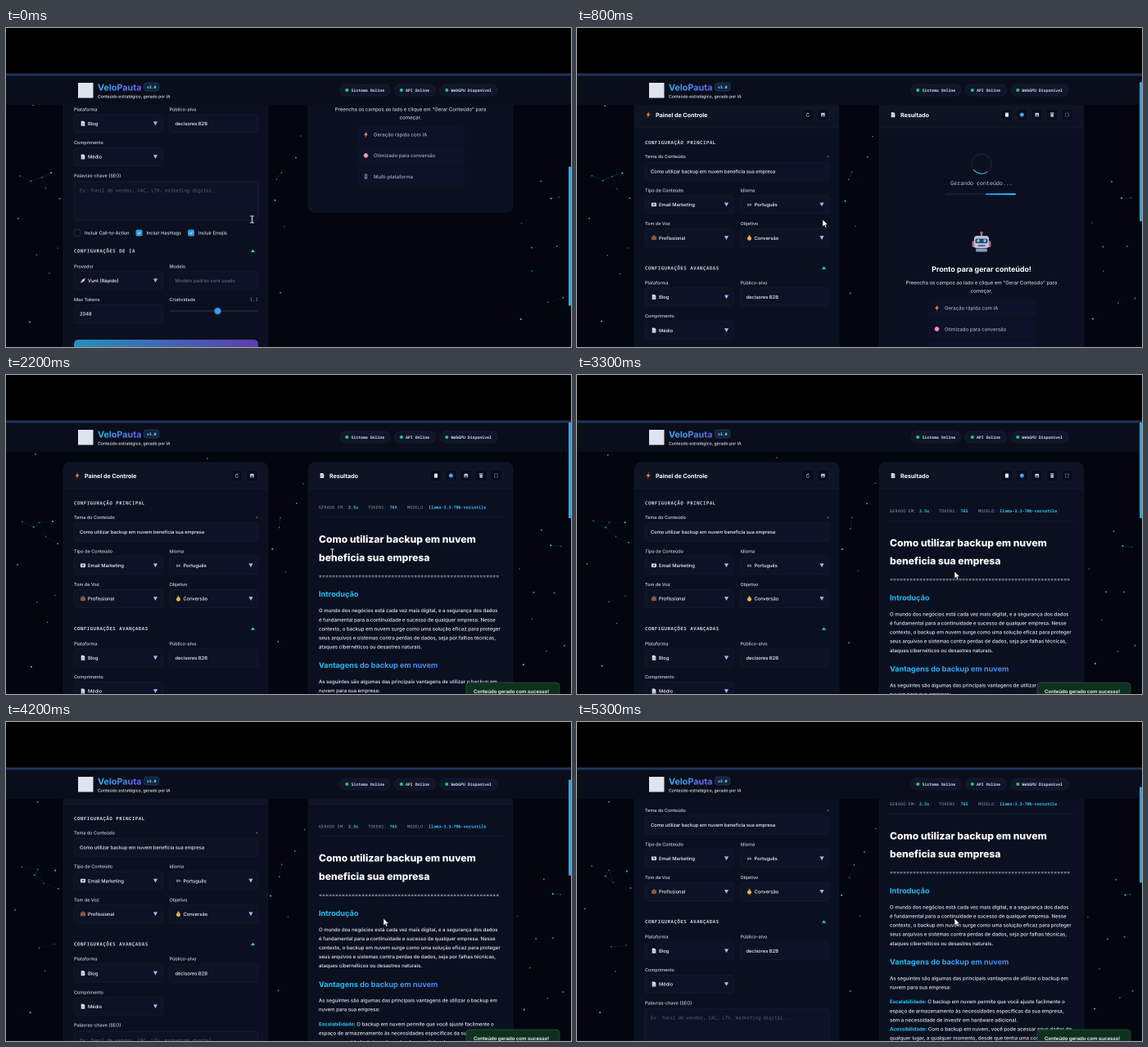
Recreate the animation shown at these times as an HTML page with a canvas. Size 690 by 390 pixels, loop 5.4 s.

```html
<!DOCTYPE html>
<html lang="pt-BR">
<head>
<meta charset="utf-8">
<title>Gerador de conteúdo</title>
<style>
html, body { margin: 0; width: 100%; height: 100%; overflow: hidden; background: #000; }
canvas { display: block; width: 690px; height: 390px; }
</style>
</head>
<body>
<canvas id="stage" width="1380" height="780"></canvas>
<script>
const ctx = document.getElementById('stage').getContext('2d');
ctx.scale(2, 2); // supersampled for soft small type
ctx.textRendering = 'geometricPrecision';
const LOOP = 5400, STEP = 100, RESULT_AT = 1800;
const SANS = 'Inter, sans-serif', MONO = '"Noto Sans Mono", monospace';
const CYAN = '#2fc3f2', SOFT = '#ccd4e4', DIM = '#5a6580';
const TOPIC = 'Como utilizar backup em nuvem beneficia sua empresa';

const clamp = v => Math.max(0, Math.min(1, v));
const progress = (t, from, to) => clamp((t - from) / (to - from));
const ease = p => (1 - Math.cos(Math.PI * p)) / 2;

// y is the optical middle of the line
function text(str, x, y, size = 6, color = '#f4f6fb', opt = {}) {
  const { weight = 500, font = SANS, align = 'left', spacing = 0 } = opt;
  ctx.font = `${weight} ${size}px ${font}`;
  ctx.letterSpacing = spacing + 'px';
  ctx.textAlign = align;
  ctx.fillStyle = color;
  ctx.fillText(str, x, y + size * 0.39);
}

function box(x, y, w, h, r, fill, stroke) {
  ctx.beginPath();
  ctx.roundRect(x, y, w, h, r);
  if (fill) { ctx.fillStyle = fill; ctx.fill(); }
  if (stroke) { ctx.strokeStyle = stroke; ctx.lineWidth = 0.7; ctx.stroke(); }
}

function dot(x, y, r, color) {
  ctx.beginPath();
  ctx.arc(x, y, r, 0, 7);
  ctx.fillStyle = color;
  ctx.fill();
}

function shape(points, fill, stroke) {
  ctx.beginPath();
  points.forEach(([x, y]) => ctx.lineTo(x, y));
  ctx.closePath();
  ctx.fillStyle = fill;
  ctx.fill();
  if (stroke) { ctx.strokeStyle = stroke; ctx.lineWidth = 0.6; ctx.stroke(); }
}

function gradient(x0, x1, from, to) {
  const g = ctx.createLinearGradient(x0, 0, x1, 0);
  g.addColorStop(0, from);
  g.addColorStop(1, to);
  return g;
}

const icons = {
  bolt: (x, y) => shape([[x + 1, y - 4], [x - 2.5, y + 0.7], [x - 0.3, y + 0.7], [x - 1, y + 4], [x + 2.5, y - 1], [x + 0.4, y - 1]], '#f0823c'),
  page(x, y) {
    shape([[x - 2.3, y - 3], [x + 0.8, y - 3], [x + 2.3, y - 1.5], [x + 2.3, y + 3], [x - 2.3, y + 3]], '#dfe3eb');
    for (let i = 0; i < 3; i++) box(x - 1.5, y - 0.7 + i * 1.2, 3, 0.4, 0, '#8791a8');
  },
  mail(x, y) {
    box(x - 3, y - 2.3, 6, 4.6, 0.6, '#d8e0f2');
    box(x - 1.3, y - 1.2, 2.6, 2.4, 0, '#4a73c4');
  },
  flag: (x, y) => text('BR', x, y, 3.8, '#d5dbe8', { weight: 600, align: 'center' }),
  bag(x, y) {
    box(x - 1.2, y - 3.2, 2.4, 1.8, 0.5, '#8c5c40');
    box(x - 3, y - 2, 6, 4.6, 0.8, '#8c5548');
  },
  money(x, y) {
    box(x - 1, y - 3.2, 2, 3, 0.5, '#d6a24a');
    dot(x, y + 0.7, 2.5, '#eeb04c');
  },
  rocket(x, y) {
    shape([[x + 3, y - 3], [x + 1.6, y + 0.6], [x - 1.4, y + 2.4], [x - 2.4, y + 1.2], [x - 0.4, y - 1.6]], '#d9c4d4');
    dot(x - 2, y + 2, 1.1, '#e05a5a');
  },
  target(x, y) {
    dot(x, y, 3, '#d8577e');
    dot(x, y, 1.8, '#f0d5de');
    dot(x, y, 0.9, '#d8577e');
  },
  phone: (x, y) => { box(x - 1.7, y - 3, 3.4, 6, 0.6, '#8492ae'); box(x - 1.1, y - 2.2, 2.2, 4, 0, '#3a4a6c'); },
  reload: (x, y) => text('↻', x, y, 6, '#c3cbdc', { align: 'center' }),
  disk: (x, y) => { box(x - 2.3, y - 2.3, 4.6, 4.6, 0.6, '#bcc7da'); box(x - 1.3, y, 2.6, 2, 0, '#4a566e'); },
  clip: (x, y) => { box(x - 2, y - 2.4, 4, 5, 0.5, '#e3e6ec'); box(x - 1, y - 3, 2, 1.1, 0.3, '#a28463'); },
  globe: (x, y) => { dot(x, y, 2.6, '#3a92dc'); dot(x - 0.5, y - 0.4, 1, '#7bc4e8'); },
  bin: (x, y) => { box(x - 2.4, y - 2.7, 4.8, 1, 0, '#c4ccd9'); box(x - 1.8, y - 1.3, 3.6, 4, 0.4, '#aab4c6'); },
  expand: (x, y) => {
    ctx.setLineDash([1.2, 1.2]);
    box(x - 2, y - 2, 4, 4, 0, null, '#a6b0c4');
    ctx.setLineDash([]);
  }
};

function panel(x, bottom, icon, title, tools, firstTool) {
  box(x, 107, 250, bottom - 107, 8, '#0b1020', '#12182a');
  box(x, 107, 250, 32, [8, 8, 0, 0], '#0f1425');
  box(x, 138.6, 250, 0.7, 0, '#171d30');
  icons[icon](x + 17, 123);
  text(title, x + 26, 123, 7.15, '#f8f9fc', { weight: 700 });
  tools.forEach((name, i) => {
    const tx = firstTool + i * 18.4;
    box(tx - 7, 116, 14, 14, 3, '#090d1b', '#171d31');
    icons[name](tx, 123);
  });
}

const label = (str, x, y) => text(str, x, y, 5.5, SOFT);
const heading = (str, y) => text(str, 83, y, 5.7, SOFT, { weight: 600, font: MONO, spacing: 0.53 });
const triangle = (x, y, d, color) => shape([[x - 2.6, y - d], [x + 2.6, y - d], [x, y + d]], color);

function field(name, x, y, value, icon, color) {
  label(name, x, y);
  box(x, y + 6.5, 108.5, 22, 4, '#0d1225', '#161c30');
  if (icon) {
    icons[icon](x + 11, y + 17.5);
    triangle(x + 99.5, y + 17.5, 2.4, '#a9b3ee');
  }
  text(value, x + (icon ? 17 : 7), y + 17.5, 5.75, color);
}

function form() {
  panel(70, 660, 'bolt', 'Painel de Controle', ['reload', 'disk'], 282);
  heading('CONFIGURAÇÃO PRINCIPAL', 156.5);
  label('Tema do Conteúdo', 83, 174);
  text('*', 305, 175, 5.5, '#e04c5c');
  box(83, 181, 225, 22, 4, '#0d1225', '#161c30');
  text(TOPIC, 90, 192, 5.75);
  field('Tipo de Conteúdo', 83, 215.3, 'Email Marketing', 'mail');
  field('Idioma', 199.5, 215.3, 'Português', 'flag');
  field('Tom de Voz', 83, 256, 'Profissional', 'bag');
  field('Objetivo', 199.5, 256, 'Conversão', 'money');

  heading('CONFIGURAÇÕES AVANÇADAS', 310);
  triangle(301.5, 310, -1.8, CYAN);
  field('Plataforma', 83, 328.3, 'Blog', 'page');
  field('Público-alvo', 199.5, 328.3, 'decisores B2B');
  field('Comprimento', 83, 369, 'Médio', 'page');
  label('Palavras-chave (SEO)', 83, 409.2);
  box(83, 417, 225, 47, 4, '#0d1225', '#1a2135');
  text('Ex: funil de vendas, CAC, LTV, marketing digital...', 90, 427.3, 5.6, DIM, { font: MONO });
  [['Call-to-Action', 87], ['Hashtags', 162.5], ['Emojis', 226]].forEach(([name, x], i) => {
    box(x - 4, 475.5, 8, 8, 2, i ? '#2f9be0' : '#0b1122', i ? null : '#26365a');
    if (i) text('✓', x, 479.5, 5.5, '#eaf6ff', { weight: 700, align: 'center' });
    text('Incluir ' + name, x + 9, 479.5, 5.5, '#dfe4ee');
  });

  heading('CONFIGURAÇÕES DE IA', 501.3);
  triangle(301.5, 501.3, -1.8, '#2fd6a8');
  field('Provedor', 83, 520.3, 'Vunt (Rápido)', 'rocket');
  field('Modelo', 199.5, 520.3, 'Modelo padrão será usado', null, DIM);
  field('Max Tokens', 83, 561, '2048');
  label('Criatividade', 199.5, 561);
  text('1.1', 308, 561, 5.6, CYAN, { font: MONO, align: 'right' });
  // the slider stands in for a second field
  box(199.5, 574, 108.5, 2, 1, '#1b2338');
  dot(258.5, 575, 5, '#2a78c455');
  dot(258.5, 575, 3.8, '#3fa0ee');
  box(83, 610, 225, 26, 5, gradient(83, 308, '#2590ba', '#5b3dae'));
}

function loader(t) {
  ctx.lineWidth = 1.1;
  ctx.strokeStyle = '#1a2238';
  ctx.beginPath();
  ctx.arc(494, 183, 12, 0, 7);
  ctx.stroke();
  const a = Math.PI * (0.3 + (t - 800) / 500);
  ctx.strokeStyle = '#2fb8d8';
  ctx.beginPath();
  ctx.arc(494, 183, 12, a, a + Math.PI * 0.5);
  ctx.stroke();
  text('Gerando conteúdo...', 494, 206.5, 6.65, '#b9c3d8', { font: MONO, align: 'center' });
  box(450, 219, 87, 2, 1, '#161d32');
  const x = 413 + 124 * ((t + 240) / 1500 % 1), left = Math.max(450, x);
  box(left, 219, Math.min(537, x + 37) - left, 2, 1, gradient(left, left + 37, '#2a86d8', '#35c6f0'));
}

function emptyState() {
  box(493.2, 267, 1.6, 5, 0, '#9aa6bc');
  dot(494, 267.5, 1.7, '#e0565e');
  box(482.5, 277, 23, 8, 2, '#c7607a');
  box(485, 271, 18, 15, 3, '#b9c4dc');
  box(486.5, 274.5, 15, 5.5, 2, '#34405e');
  dot(490, 277, 1.7, '#6cc8f2');
  dot(498, 277, 1.7, '#6cc8f2');
  box(489.5, 282, 9, 2, 0.8, '#5a6684');
  box(487, 286.5, 14, 4, 1.5, '#8b97b4');
  text('Pronto para gerar conteúdo!', 494, 311.7, 8.9, '#fff', { weight: 700, align: 'center' });
  text('Preencha os campos ao lado e clique em "Gerar Conteúdo" para', 494, 328, 6, '#c6cedd', { align: 'center' });
  text('começar.', 494, 338, 6, '#c6cedd', { align: 'center' });
  [['bolt', 'Geração rápida com IA'], ['target', 'Otimizado para conversão'], ['phone', 'Multi-plataforma']].forEach(([icon, str], i) => {
    const y = 359.3 + i * 25.6;
    box(429, y - 11, 131, 22, 3, '#0c1228');
    icons[icon](439.5, y);
    text(str, 449, y, 6, '#a3aec6');
  });
}

const lines = (rows, y) => rows.forEach((row, i) => text(row, 382, y + i * 11.05, 6.06, '#e6eaf1'));

function term(name, rest, y) {
  text(name, 382, y, 6.06, CYAN, { weight: 700 });
  text(rest, 382 + ctx.measureText(name + ' ').width, y, 6.06, '#e6eaf1');
}

function result(t) {
  const p = progress(t, RESULT_AT, RESULT_AT + 1000);
  ctx.save();
  ctx.globalAlpha = clamp(0.3 + p * 2);
  ctx.translate(0, -20 * (1 - p) ** 3);
  [['GERADO EM:', 382, '2.5s', 418], ['TOKENS:', 442, '765', 468.5], ['MODELO:', 490, 'llama-3.3-70b-versatile', 516]].forEach(([key, x, value, vx]) => {
    text(key, x, 166, 5.1, '#8892a8', { font: MONO, spacing: 0.2 });
    text(value, vx, 166, 5.1, CYAN, { font: MONO, weight: 600 });
  });
  box(382, 178, 225, 0.6, 0, '#171e32');
  text('Como utilizar backup em nuvem', 382, 204.7, 12.1, '#fff', { weight: 800 });
  text('beneficia sua empresa', 382, 227, 12.1, '#fff', { weight: 800 });
  ctx.font = `500 6px ${SANS}`;
  ctx.letterSpacing = '0px';
  text('='.repeat(Math.round(219 / ctx.measureText('=').width)), 382, 249.8, 6, '#d5dae5');
  const blue = gradient(382, 607, '#20c6f4', '#6a5cf0');
  text('Introdução', 382, 272, 9.15, blue, { weight: 700 });
  lines([
    'O mundo dos negócios está cada vez mais digital, e a segurança dos dados',
    'é fundamental para a continuidade e sucesso de qualquer empresa. Nesse',
    'contexto, o backup em nuvem surge como uma solução eficaz para proteger',
    'seus arquivos e sistemas contra perdas de dados, seja por falhas técnicas,',
    'ataques cibernéticos ou desastres naturais.'
  ], 292.2);
  text('Vantagens do backup em nuvem', 382, 359, 9.15, blue, { weight: 700 });
  lines(['As seguintes são algumas das principais vantagens de utilizar o backup em', 'nuvem para sua empresa:'], 379);
  term('Escalabilidade:', 'O backup em nuvem permite que você ajuste facilmente o', 407.8);
  lines(['espaço de armazenamento às necessidades específicas da sua empresa,', 'sem a necessidade de investir em hardware adicional.'], 418.9);
  term('Acessibilidade:', 'Com o backup em nuvem, você pode acessar seus dados de', 441);
  lines(['qualquer lugar, a qualquer momento, desde que tenha uma conexão'], 452);
  ctx.restore();
}

const stars = [
  [17, 178], [42, 183], [58, 180], [46, 195], [66, 206], [32, 189], [50, 302], [40, 275], [28, 358], [62, 272], [36, 95], [12, 230],
  [338, 177], [331, 188], [326, 210], [343, 240], [352, 160], [335, 326], [362, 130], [245, 103],
  [668, 211], [675, 208], [671, 264], [645, 268], [640, 300], [663, 335], [630, 353], [627, 240], [656, 190], [679, 328]
];

function sky(t) {
  const pts = stars.map(([x, y], i) => [x + 3 * Math.sin(t / 1900 + i * 2.4), y + 3 * Math.cos(t / 2300 + i * 1.7)]);
  ctx.lineWidth = 0.5;
  pts.forEach(([x, y], i) => {
    pts.slice(i + 1).forEach(([u, v]) => {
      const d = Math.hypot(u - x, v - y);
      if (d > 25) return;
      ctx.strokeStyle = `rgba(40,150,190,${0.7 * (1 - d / 25)})`;
      ctx.beginPath();
      ctx.moveTo(x, y);
      ctx.lineTo(u, v);
      ctx.stroke();
    });
    dot(x, y, 0.7 + i % 3 * 0.2, i % 2 ? '#1f7f9c' : '#2fb0cc');
  });
}

function header() {
  ctx.fillStyle = '#000';
  ctx.fillRect(0, 0, 690, 56);
  ctx.fillStyle = '#0a0e1b';
  ctx.fillRect(0, 56, 690, 38);
  ctx.fillStyle = '#21335a';
  ctx.fillRect(0, 55.5, 690, 3);
  box(88, 67, 18.5, 18.5, 0, '#dce4ee');
  text('VeloPauta', 112, 72.3, 10.8, gradient(112, 167, '#2fb9f4', '#6a5cf0'), { weight: 700 });
  box(168.5, 67, 18.5, 10, 3, '#10263f', '#1b3c5c');
  text('v3.0', 177.8, 72, 4.8, '#9fd4ee', { weight: 700, font: MONO, align: 'center' });
  text('Conteúdo estratégico, gerado por IA', 112, 83.3, 5.1, '#e3e8f1');
  [['Sistema Online', 408, 61], ['API Online', 474.5, 50], ['WebGPU Disponível', 530, 70]].forEach(([str, x, w]) => {
    box(x, 69, w, 14, 7, '#10162a', '#161e34');
    dot(x + 8.3, 76, 2, '#22c574');
    text(str, x + 13.5, 76, 4.85, '#d3dae8', { weight: 600, font: MONO });
  });
}

function toast(t) {
  const x = 562 + 128 * (1 - progress(t, RESULT_AT - 50, RESULT_AT + 200)) ** 2;
  box(x, 376, 114, 22, 4, '#10301f', '#1f5a38');
  text('Conteúdo gerado com sucesso!', x + 9, 386.6, 6, '#f2fbf5', { weight: 600 });
}

function pointer(t) {
  const a = ease(progress(t, 1100, 1900)), b = ease(progress(t, 2350, 3000));
  const x = 300 + 98 * a + 63 * b, y = 234 - 17 * a + 23 * b;
  if (t < 250 || (t >= 1900 && t < 2500)) {
    ctx.fillStyle = '#e8ebf0';
    ctx.fillRect(x, y - 4, 1, 8);
    ctx.fillRect(x - 2, y - 4.5, 5, 0.9);
    ctx.fillRect(x - 2, y + 3.6, 5, 0.9);
  } else {
    shape([[0, 0], [0, 9], [2.1, 7.1], [3.5, 10.3], [5, 9.6], [3.6, 6.6], [6.3, 6.3]].map(([u, v]) => [x + u, y + v]), '#fff', '#222');
  }
}

function draw(t) {
  const done = t >= RESULT_AT;
  const scroll = 229 * (1 - ease(progress(t, 0, 970))) + 66 * ease(progress(t, 3600, 4680));
  ctx.fillStyle = '#03050f';
  ctx.fillRect(0, 0, 690, 390);
  sky(t);
  ctx.save();
  ctx.translate(0, -scroll);
  form();
  panel(369, done ? 900 : 454, 'page', 'Resultado', ['clip', 'globe', 'disk', 'bin', 'expand'], 525);
  if (done) result(t);
  else { loader(t); emptyState(); }
  ctx.restore();
  header();
  box(687, 58 + scroll * (done ? 0.325 : 0.487), 3, done ? 117 : 170, 0, '#3a9fd6');
  if (t >= RESULT_AT - 50) toast(t);
  pointer(t);
}

const start = performance.now();
function tick() {
  const t = (performance.now() - start) % LOOP;
  draw(Math.floor(t / STEP) * STEP);
  requestAnimationFrame(tick);
}
tick();
</script>
</body>
</html>
```
